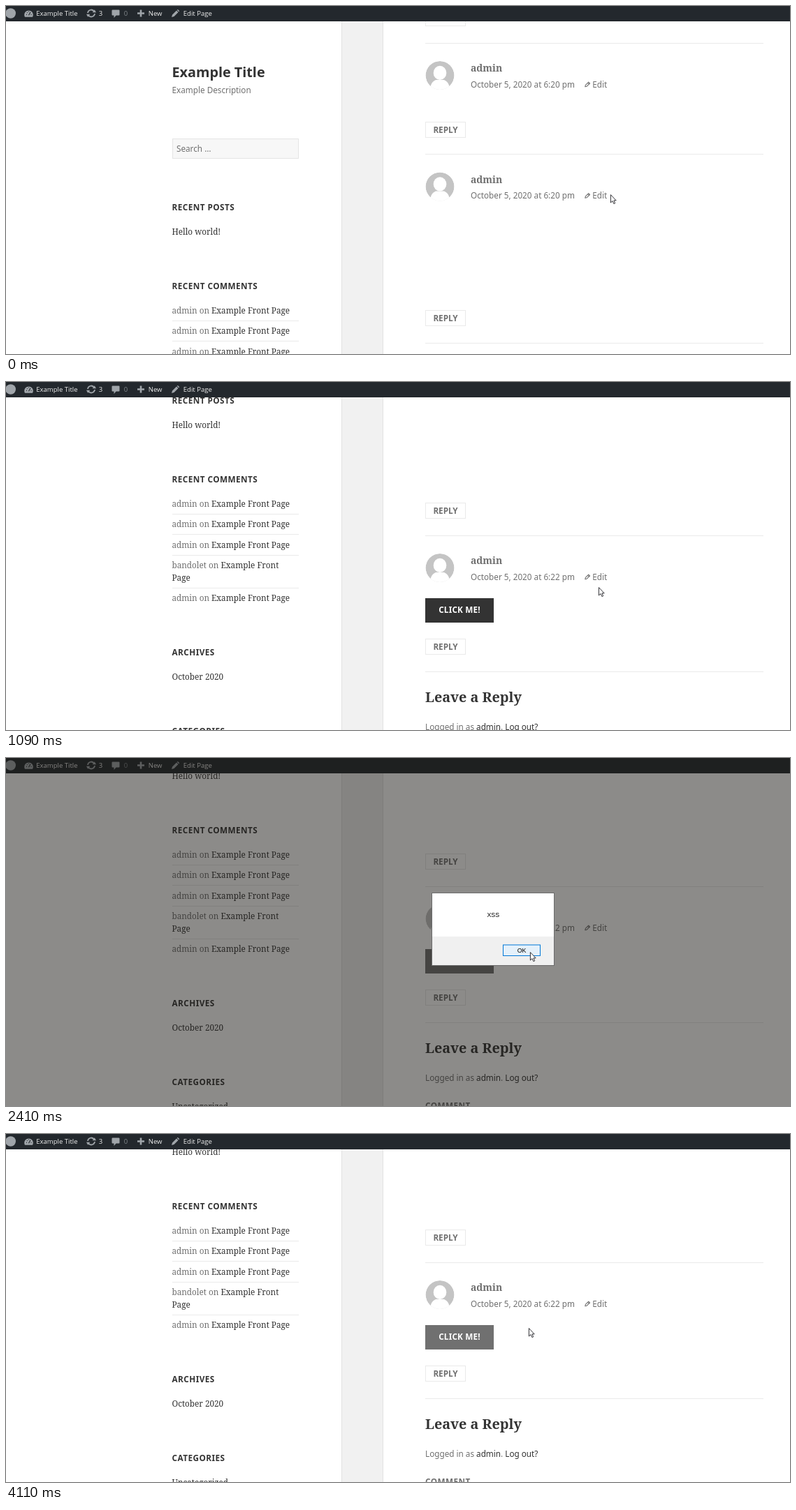
Recreate the animation shown at these times as an HTML page. Size 1122 by 499 pixels, loop 4190 ms.

```html
<!DOCTYPE html>
<html lang="en">
<head>
<meta charset="utf-8">
<title>Comment page</title>
<style>
  html, body { margin: 0; width: 100%; height: 100%; overflow: hidden; background: #fff; }
  svg { display: block; position: absolute; left: 0; top: 0; }
  text { white-space: pre; }
  .sans { font-family: "Noto Sans", sans-serif; }
  .serif { font-family: "Noto Serif", serif; }
  .bar { font-family: "Open Sans", sans-serif; }
  .box { font-family: "Liberation Sans", Arial, sans-serif; }
</style>
</head>
<body>
<svg id="stage" width="1122" height="499" viewBox="0 0 1122 499"></svg>
<script>
const DARK = '#333', GREY = '#707070', RULE = '#eaeaea', ICON = '#a0a5aa';
const UNIT = 11.73, BODY = 13.93, TITLE = 19.8;

const text = (x, y, str, font, size, fill, extra = '') =>
  `<text x="${x}" y="${y}" class="${font}" font-size="${size}" fill="${fill}" ${extra}>${str}</text>`;
const rect = (x, y, w, h, fill, extra = '') =>
  `<rect x="${x}" y="${y}" width="${w}" height="${h}" fill="${fill}" ${extra}/>`;
const path = (d, fill, extra = '') => `<path d="${d}" fill="${fill}" ${extra}/>`;
const group = (id, inner) => `<g id="${id}">${inner}</g>`;
const at = (x, y, inner) => `<g transform="translate(${x} ${y})">${inner}</g>`;
const bold = 'font-weight="700"';
const spaced = `${bold} letter-spacing="${0.04 * UNIT}"`;
const mid = 'text-anchor="middle"';

// Sidebar
const heading = (y, str) => text(237.5, y, str, 'sans', UNIT, DARK, spaced);
const link = (x, y, str) => text(x, y, str, 'serif', UNIT, DARK);
const recent = (y, who, x, str) =>
  text(237.5, y, who + ' on', 'serif', UNIT, GREY) + link(x, y, str);
const sideRule = y => rect(238, y, 181, 1, RULE);

function sidebar() {
  let out = text(237.5, 102, 'Example Title', 'sans', TITLE, DARK, bold)
    + text(237.5, 125, 'Example Description', 'sans', UNIT, GREY)
    + rect(238.5, 190.5, 180, 28, '#f7f7f7', `stroke="#e4e4e4"`)
    + text(244, 209, 'Search …', 'sans', UNIT, GREY)
    + heading(293, 'RECENT POSTS') + link(237.5, 328, 'Hello world!')
    + heading(406, 'RECENT COMMENTS');
  for (let i = 0; i < 3; i++) {
    const y = 441 + i * 29.33;
    out += recent(y, 'admin', 294, 'Example Front Page') + sideRule(Math.round(y + 10));
  }
  return out + recent(529, 'bandolet', 307.5, 'Example Front') + link(237.5, 546.6, 'Page')
    + sideRule(557) + recent(576, 'admin', 294, 'Example Front Page')
    + heading(654, 'ARCHIVES') + link(237.5, 689, 'October 2020')
    + heading(767, 'CATEGORIES') + link(237.5, 802, 'Uncategorized');
}

// Comment column
const rule = y => rect(600, y, 484, 1, RULE);
const reply = y => rect(600.5, y + .5, 57, 22, '#fff', `stroke="${RULE}"`)
  + text(629, y + 16, 'REPLY', 'sans', UNIT, GREY, `${bold} ${mid}`);
const avatar = `<g clip-path="url(#round)"><circle r="20.5" fill="#c4c4c4"/>
  <ellipse cy="-3.6" rx="9.3" ry="10.2" fill="#fff"/>
  ${path('M-14 21C-13.500 12-11 9-6 6.500H6C11 9 13.500 12 14 21Z', '#fff')}</g>`;
const pencil = path('M.8 7.300 1.400 4.900 5.700.700 7.500 2.500 3.200 6.700ZM4.600 1.800 6.400 3.600',
  'none', `stroke="${GREY}" stroke-width="1.100" stroke-linejoin="round"`);
const comment = (y, time) => at(621, y + 46.5, avatar)
  + text(665, y + 41, 'admin', 'serif', BODY, GREY, bold)
  + text(665, y + 63.7, `October 5, 2020 at ${time} pm`, 'sans', UNIT, GREY)
  + at(828, y + 55.5, pencil) + text(839.3, y + 63.7, 'Edit', 'sans', UNIT, GREY);
const dark = str => `<tspan fill="${DARK}">${str}</tspan>`;

const comments = () => reply(6) + rule(53) + comment(53, '6:20') + reply(166)
  + rule(212) + comment(212.5, '6:20') + reply(436)
  + rule(483) + comment(483, '6:22')
  + rect(600, 573, 98, 35, DARK, 'id="button"')
  + text(649, 594.3, 'CLICK ME!', 'sans', UNIT, '#fff', `${bold} ${mid} letter-spacing=".2"`)
  + reply(631) + rule(678)
  + text(600, 722, 'Leave a Reply', 'serif', TITLE, DARK, bold)
  + text(600, 762, `Logged in as ${dark('admin')}. ${dark('Log out?')}`, 'sans', UNIT, GREY)
  + text(600, 802, 'COMMENT', 'sans', UNIT, GREY, spaced);

// Admin bar
function adminBar() {
  const label = (x, str, fill = '#eee') => text(x, 14, str, 'bar', 9.53, fill);
  const gauge = path('M1 11A6.300 6.300 0 1 1 12 11Z', ICON)
    + path('M6.500 8.500 9 4M3 7.500H4M4 4.300 4.700 5M6.500 2.800V3.800M9.500 7.500H10.500', 'none',
      'stroke="#23282d" stroke-width="1.200"');
  const arc = path('M-5-.500A5 5 0 0 1 3.800-3.200', 'none', `stroke="${ICON}" stroke-width="1.800"`)
    + path('M1.700-1.300H7L4.800-5.300Z', ICON);
  const bubble = path('M1 0H10Q11 0 11 1V7Q11 8 10 8H6L3 11.500V8H1Q0 8 0 7V1Q0 0 1 0Z', ICON);
  const pen = path('M0 11 1 7.500 7 1.500 9.500 4 3.500 10ZM7.700.800 8.500 0Q9.200-.300 11 2V2.700L10.200 3.300Z', ICON);
  return rect(0, 0, 1122, 22, '#23282d')
    + `<circle cx="6.700" cy="10.500" r="7.300" fill="${ICON}"/>`
    + at(26, 4.8, gauge) + label(43.3, 'Example Title')
    + at(122, 10.5, arc + `<g transform="rotate(180)">${arc}</g>`) + label(132.7, '3')
    + at(151.5, 5.5, bubble) + label(168.7, '0', '#82878c')
    + path('M191.700 5.500H194.300V9.200H198V11.800H194.300V15.500H191.700V11.800H188V9.200H191.700Z', ICON)
    + label(203.8, 'New') + at(237, 5, pen) + label(253.8, 'Edit Page');
}

const dialog = () => rect(0, 0, 1122, 499, 'rgba(26,25,20,.5)')
  + rect(609.5, 193.5, 175, 104, '#fff', 'stroke="#6c6c6c"')
  + rect(610, 256, 174, 41, '#f0f0f0')
  + text(697.3, 228, 'XSS', 'box', 8.8, '#000', mid)
  + rect(711.5, 268, 53, 15.5, '#e1e1e1', 'id="ok"')
  + text(738, 278.6, 'OK', 'box', 8.8, '#000', mid);

const outline = 'stroke="#1c1c22" stroke-width=".9" stroke-linejoin="round"';
const arrow = path('M.4.600V12L3 9.600 4.900 13.600 6.700 12.800 4.900 8.900H8.200Z', '#fff', outline);
const hand = path('M-1.300 1Q0-.800 1.200 1V6Q2.600 5.200 3.500 6.500 4.900 5.800 5.500 7.200 7.300 6.900 7.200 8.700'
  + 'V11Q7 13.500 5.800 15.500H-.500Q-1.600 13.500-4.400 9.700C-4.900 8.200-3 7.700-1.300 9.600Z', '#fff', outline);

document.getElementById('stage').innerHTML =
  '<defs><clipPath id="round"><circle r="20.5"/></clipPath></defs>'
  + rect(0, 0, 1122, 499, '#fff') + rect(480, 22, 60, 477, '#f1f1f1')
  + rect(480, 22, 1, 477, '#e2e2e2') + rect(539, 22, 1, 477, '#e2e2e2')
  + group('side', sidebar()) + group('main', comments()) + adminBar()
  + group('dialog', dialog())
  + '<circle id="halo" r="9" fill="rgba(240,240,0,.62)"/>'
  + group('pointer', group('arrow', arrow) + group('hand', hand));

const el = id => document.getElementById(id);
const [side, main, button, box, ok, halo, pointer, arrowEl, handEl] =
  ['side', 'main', 'button', 'dialog', 'ok', 'halo', 'pointer', 'arrow', 'hand'].map(el);

// [start ms, scroll, pointer x, pointer y]
const LOOP = 4190;
const steps = [
  [0, 0, 865, 270], [230, 0, 877, 281], [300, 0, 884, 288],
  [530, 56, 884, 288], [620, 132.5, 884, 288], [700, 180, 884, 288], [770, 199, 884, 288],
  [940, 212, 880, 290], [1020, 238, 867, 293], [1090, 262.5, 848, 294],
  [1170, 283, 802, 297], [1240, 295, 740, 296], [1320, 298.5, 690, 294], [1400, 298.5, 668, 292],
  [1470, 298.5, 657, 290],
  [2100, 298.5, 664, 290], [2180, 298.5, 690, 288], [2260, 298.5, 722, 283],
  [2330, 298.5, 742, 279], [2410, 298.5, 750, 278], [4110, 298.5, 748, 278]
];

const show = (node, on) => node.setAttribute('visibility', on ? 'visible' : 'hidden');
const set = (node, attrs) => { for (const k in attrs) node.setAttribute(k, attrs[k]); };
const move = (node, x, y) => node.setAttribute('transform', `translate(${x} ${y})`);

function draw(t) {
  const [, scroll, x, y] = steps.findLast(s => s[0] <= t);
  const open = t >= 1720 && t < 3180;
  const press = t >= 3020 && open;
  const click = t >= 1550 && t < 1720;
  const hover = t >= 1320;
  const overOk = open && x > 711;

  move(side, 0, -Math.floor(scroll));
  move(main, 0, -Math.ceil(scroll));
  set(button, { fill: hover ? GREY : DARK });
  show(box, open);
  set(ok, {
    fill: press ? '#cce4f7' : overOk ? '#e5f1fb' : '#e1e1e1',
    stroke: press ? '#005499' : '#0078d7',
    'stroke-width': overOk ? 1 : 2
  });
  show(halo, click || press);
  move(halo, x, click ? y + 1 : y);
  move(pointer, x, y);
  const pointing = hover && t < 1720;
  show(arrowEl, !pointing);
  show(handEl, pointing);
}

const start = performance.now();
function tick() {
  draw((performance.now() - start) % LOOP);
  requestAnimationFrame(tick);
}
tick();
</script>
</body>
</html>
```
